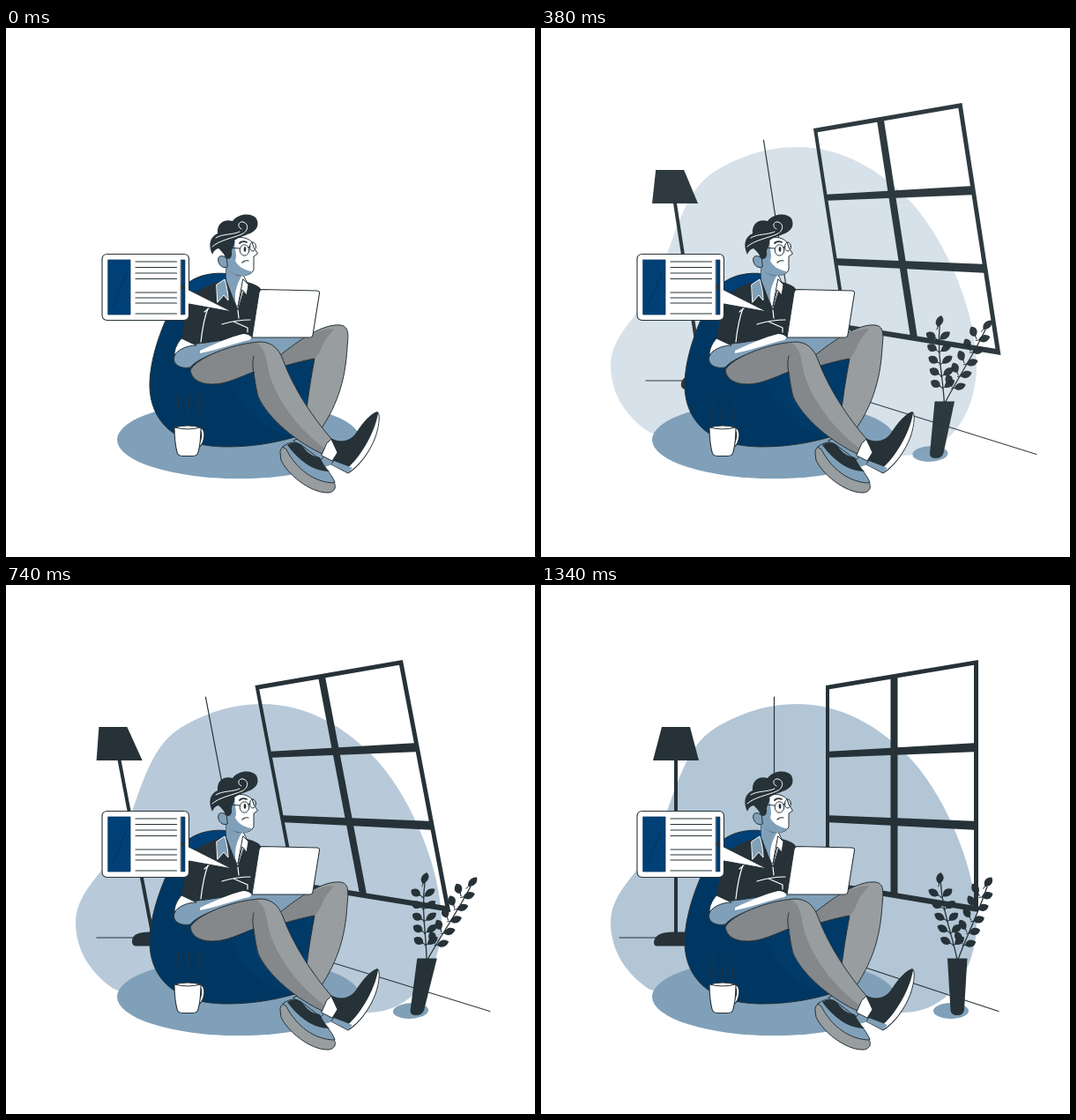
An HTML page with a canvas that plays this animation: 600x600 px, repeating every 1360 ms.

```html
<!DOCTYPE html>
<html lang="en">
<head>
<meta charset="utf-8">
<title>Reading in a beanbag</title>
<style>
html, body { margin: 0; width: 100%; height: 100%; overflow: hidden; background: #fff; }
canvas { display: block; width: 100vw; height: 100vh; }
</style>
</head>
<body>
<canvas id="stage" width="600" height="600"></canvas>
<script>
const ctx = document.getElementById('stage').getContext('2d');
const LOOP = 1360;
const DARK = '#263238', WHITE = '#fff', BLUE = '#004076', NAVY = '#003a68', DEEP = '#003762';
const SKY = '#80a0b9', MIST = '#b2c6d6', GREY = '#989d9f', SHADE = '#84888a';

const mix = (a, b, k) => a + (b - a) * k;

function track(keys, t) {
  let i = 1;
  while (i < keys.length - 1 && t >= keys[i][0]) i++;
  const [t0, v0] = keys[i - 1], [t1, v1] = keys[i];
  return mix(v0, v1, Math.max(0, Math.min(1, (t - t0) / (t1 - t0))));
}

// Overshooting cubic-bezier(.36, -.01, .5, 1.38)
function ease(x) {
  const curve = (u, a, b) => 3 * (1 - u) * (1 - u) * u * a + 3 * (1 - u) * u * u * b + u * u * u;
  let lo = 0, hi = 1;
  for (let i = 0; i < 24; i++) {
    const mid = (lo + hi) / 2;
    if (curve(mid, .36, .5) < x) lo = mid; else hi = mid;
  }
  return curve(lo, -.01, 1.38);
}

// Whole numbers mark the ends of the three swing stages.
const swingKeys = [[0, .12], [300, .527], [460, .75], [559, .75], [560, .783], [620, .873], [796, 1],
  [900, 1.42], [1032, 2], [1140, 2.39], [1239, 2.39], [1240, 2.5], [1340, 3], [1360, 3]];
const fadeKeys = [[0, 0], [300, .4], [460, .64], [559, .64], [560, .67], [620, .75], [796, 1]];

function swing(t) {
  const q = track(swingKeys, t), stage = Math.min(2, Math.floor(q)), p = ease(q - stage);
  const skews = [-.364, .176, -.035, 0];
  return {
    skew: mix(skews[stage], skews[stage + 1], p),
    x: stage ? 0 : 300 * (1 - p),
    alpha: t < 20 ? 0 : stage ? 1 : Math.max(0, Math.min(1, p))
  };
}

function shape(d, fill, stroke, width = 1) {
  const path = new Path2D(d);
  if (fill) { ctx.fillStyle = fill; ctx.fill(path); }
  if (stroke) { ctx.strokeStyle = stroke; ctx.lineWidth = width; ctx.stroke(path); }
}
const line = (d, color = DARK, width = 1) => shape(d, null, color, width);

function oval(x, y, rx, ry, fill, stroke) {
  ctx.beginPath();
  ctx.ellipse(x, y, rx, ry, 0, 0, 7);
  if (fill) { ctx.fillStyle = fill; ctx.fill(); }
  if (stroke) { ctx.strokeStyle = stroke; ctx.lineWidth = 1; ctx.stroke(); }
}

// A leaf growing from its base point; turn 0 points right.
function leaf(x, y, turn) {
  ctx.save();
  ctx.translate(x, y);
  ctx.rotate(turn);
  line('M-3,0H2');
  shape('M0,0C3,-6 9,-6 13,-1C10,5 4,5 0,0Z', DARK);
  ctx.restore();
}

function swinging(move, side, centreY, draw) {
  ctx.save();
  ctx.globalAlpha = move.alpha;
  ctx.transform(1, 0, side * move.skew, 1, side * (move.x - move.skew * centreY), 0);
  draw();
  ctx.restore();
}

function drawWindow() {
  const yAt = (left, right, x) => mix(left, right, (x - 323) / 173);
  let d = 'M323,114L496,85V371L323,342Z';
  const rows = [[119, 90, 189, 179], [196, 189, 261, 268], [269, 278, 336, 364.5]];
  for (const [a, b, c, e] of rows)
    for (const [x0, x1] of [[327, 396.5], [404.5, 491]])
      d += `M${x0},${yAt(a, b, x0)}L${x1},${yAt(a, b, x1)}V${yAt(c, e, x1)}L${x0},${yAt(c, e, x0)}Z`;
  ctx.fillStyle = DARK;
  ctx.fill(new Path2D(d), 'evenodd');
}

function drawRoom() {
  line('M264.5,127V400M89,400H264.5L519,483.5', DARK, 1.2);
  shape('M137,161H169L179,199H127Z', DARK);
  shape('M151,198H155V396H151Z', DARK);
  shape('M168,409.5H131Q128,409 128,405C129,397 137,393.5 150,393.5H168Z', DARK);
  drawWindow();
}

function drawPlant() {
  oval(465, 483, 20, 9, SKY);
  shape('M461,423.5H483.5L480,482Q479,488 472,488Q465,488 464.5,482Z', DARK);
  line('M472,425C466,395 455,370 453,334M473,425C482,400 497,370 506,342', DARK, 1.3);
  leaf(451.5, 339, -1.35);
  leaf(503.5, 342, -.85);
  for (let i = 0; i < 5; i++) {
    const y = 352 + i * 13.6, a = 454 + i * 3.4, b = 500 - i * 4.8;
    leaf(a - 3, y, Math.PI + .55);
    leaf(a + 2, y + 1, -.6);
    leaf(b - 4, y - 2, Math.PI + 1.1);
    leaf(b, y + 2, -.2);
  }
}

function drawBeanbag() {
  const body = 'M253,279C235,276 214,281 203,292C180,325 164,370 163,402C162,442 187,475 251,475C283,475 314,469 340,460L352,378L290,300Z';
  shape(body, DEEP);
  shape('M253,279C235,276 214,281 203,292L208,301C220,296 240,292 253,289Z', BLUE);
  shape('M255,402C266,436 295,459 331,463L345,440L350,376L281,389Z', NAVY);
  shape('M283,413C300,420 326,425 343,418L345,447L322,455C300,445 287,430 283,413Z', BLUE);
  line(body);
}

function drawLegs() {
  const far = 'M310,372C332,354 360,335 379,337C388,338 389,345 387,362C385,402 374,432 353,461L340,442C342,420 346,396 350,375C338,377 328,380 317,383Z';
  shape(far, GREY);
  shape('M310,372C332,354 355,341 372,341C368,347 362,352 359,360C356,368 353,372 350,375C338,377 328,380 317,383Z', SHADE);
  line(far);

  shape('M326,468L339,462L365,482L356,491Z', SKY, DARK);
  shape('M311,480C313,472 322,471 327,477C337,496 351,509 368,513C376,516 375,526 366,527C345,528 318,505 312,490Z', GREY, DARK);
  shape('M314,475C320,470 328,468 335,473L356,489C362,500 371,508 373,516C350,516 329,500 318,478Z', SKY, DARK);
  shape('M319,473C326,469 332,469 337,475C343,484 350,486 356,487C359,493 362,499 367,503C347,503 331,489 319,473Z', DARK);

  const near = 'M209,388C215,375 255,358 288,356C301,356 309,363 314,376C326,409 349,443 369,466L361,484C331,471 297,443 286,418C283,407 282,397 281,390C265,396 250,404 234,404C218,404 210,397 209,388Z';
  shape(near, GREY);
  shape('M209,388C215,375 255,358 284,357C295,364 295,376 299,394C310,428 337,459 363,478L361,484C331,471 297,443 286,418C283,407 282,397 281,390C265,396 250,404 234,404C218,404 210,397 209,388Z', SHADE);
  line(near);
  line('M281,391C279,382 280,377 281,372');

  shape('M364,471L369,466L377,480L370,491L358,485Z', WHITE, DARK);
  shape('M369,466C381,472 391,468 397,460C404,449 413,438 421,435.5C425,437 423,452 419,464C412,482 400,498 388,505L369,495L376,482Z', DARK, DARK);
  shape('M422,437C424,442 422,454 418.5,464C412,481 400,497 388,504L384,502C400,490 418,461 422,437Z', WHITE);
  shape('M369,495L372,491L393,499L388,504.5Z', SKY);
}

function drawBody() {
  shape('M240,288C225,293 213,300 206,310L199,354L217,364C240,357 265,356 281,351L290,298C287,291 278,289 268,287Z', DARK);
  shape('M191,372C195,362 211,358 226,357L280,349H343C334,357 324,365 311,371C302,359 295,356 285,357C255,361 218,373 209,385C197,387 188,381 191,372Z', SKY, DARK);
  shape('M199,352L216,360C208,360 197,363 191,371C191,364 194,358 199,352Z', WHITE, DARK);
  shape('M220,366C235,359 255,350 269,347C276,347 281,351 276,354C260,357 245,364 220,369Z', WHITE);
  shape('M249,262L250,286L263,320L273,288L267,276Z', WHITE, DARK);
  shape('M249,262L250,286L261,314C258,301 262,290 268,280L266,276Z', SKY);
  shape('M239,291L248,285C250,292 252,300 252,309L247,303L240,311Z', SKY, WHITE);
  shape('M269,285L275,291L273,303L268,297L263,316Z', WHITE, DARK);
  line('M229,318C226,326 223,338 221,356M225,322L230,318M263,320L264,329M245,336C255,333 265,331 277,331M258,333L274,340V345', WHITE, 1.2);
}

function drawHead() {
  shape('M250,247C258,234 273,236 279,243L281,249L285.5,256L281,259L281,274C279,280 270,282 262,280C256,278 251,274 249,268Z', WHITE, DARK);
  shape('M250,247L260,241C258,249 263,257 260,264C263,270 270,275 279,276C276,281 269,282 262,280C255,278 250,274 249,268Z', SKY);
  shape('M250,261C245,256 239,259 241,265C242,270 247,273 251,271Z', SKY, DARK);
  shape('M234,257C229,246 231,237 240,233C239,222 247,216 257,219C263,210 279,209 284,216C288,224 284,231 274,234C270,236 264,237 259,241C260,247 256,249 256,254C257,262 252,263 249,261C248,256 243,252 241,250C237,251 235,254 234,257Z', DARK);
  line('M234,248C241,241 258,238 267,234C275,231 276,222 269,220C263,219 262,226 267,228M238,238C246,233 257,235 265,231', WHITE, 1);
  oval(270.5, 252, 5.3, 6.2, WHITE, DARK);
  oval(280, 248, 3.5, 5, null, DARK);
  line('M252,249L265,250M275,249L277,248', DARK, 1.2);
  line('M265,244Q268,241 273,243', DARK, 1.8);
  oval(271, 251, 1.4, 3, DARK);
  line('M268,266Q271,263 275,264', DARK, 1.2);
}

function drawLaptop() {
  shape('M291,296.5L353,298Q356,298.5 355.5,301L348,348Q347.5,351 344,351H279L287,300Q288,296.5 291,296.5Z', WHITE, DARK, 1.1);
}

function drawBubble() {
  shape('M115,256.5H201.5Q207.5,256.5 207.5,262.5V297L257,322L207.5,313V325Q207.5,331.5 201.5,331.5H115Q109,331.5 109,325V262.5Q109,256.5 115,256.5Z', WHITE, DARK, 1.1);
  shape('M116,263H141V325H116Z', BLUE, DEEP, .8);
  line('M137,278L121,316', DEEP, 1.2);
  for (const y of [265, 271.5, 278, 284.5, 300, 306, 312, 324]) line(`M147,${y}H193.5`, DARK, 1.1);
  shape('M198.5,263H203V325H198.5Z', BLUE, DARK, .6);
  oval(200.5, 294, 1.8, 3, DARK);
}

function drawCup() {
  const handle = 'M218,456C226,451 224,472 218,474';
  line(handle, DARK, 4);
  line(handle, WHITE, 2);
  shape('M191,453Q206,449 221,453C221,465 220,474 218,481Q217,485.5 212,485.5H200Q195,485.5 194,481C192,473 191,464 191,453Z', WHITE, DARK, 1.1);
  line('M191,453Q206,457 221,453');
  for (const x of [195, 206.5, 218])
    line(`M${x},447C${x - 3},437 ${x + 3},428 ${x},416`);
}

function render(t) {
  const move = swing(t);
  ctx.fillStyle = WHITE;
  ctx.fillRect(0, 0, 600, 600);
  ctx.globalAlpha = t < 20 ? 0 : track(fadeKeys, t);
  shape('M291,135C340,135 385,160 422,200C462,246 494,325 494,382C494,440 460,485 410,485C340,485 300,452 250,452C200,470 150,470 122,458C96,440 79,415 79,382C80,345 115,325 130,290C152,240 160,185 198,162C225,146 255,135 291,135Z', MIST);
  ctx.globalAlpha = 1;
  oval(264, 467, 138, 44, SKY);
  swinging(move, 1, 284.5, drawRoom);
  drawBeanbag();
  drawBody();
  drawLegs();
  drawHead();
  drawLaptop();
  drawBubble();
  drawCup();
  swinging(move, -1, 409, drawPlant);
}

ctx.lineJoin = ctx.lineCap = 'round';
const start = performance.now();
function tick(now) {
  render(Math.max(0, now - start) % LOOP);
  requestAnimationFrame(tick);
}
render(0);
requestAnimationFrame(tick);
</script>
</body>
</html>
```
